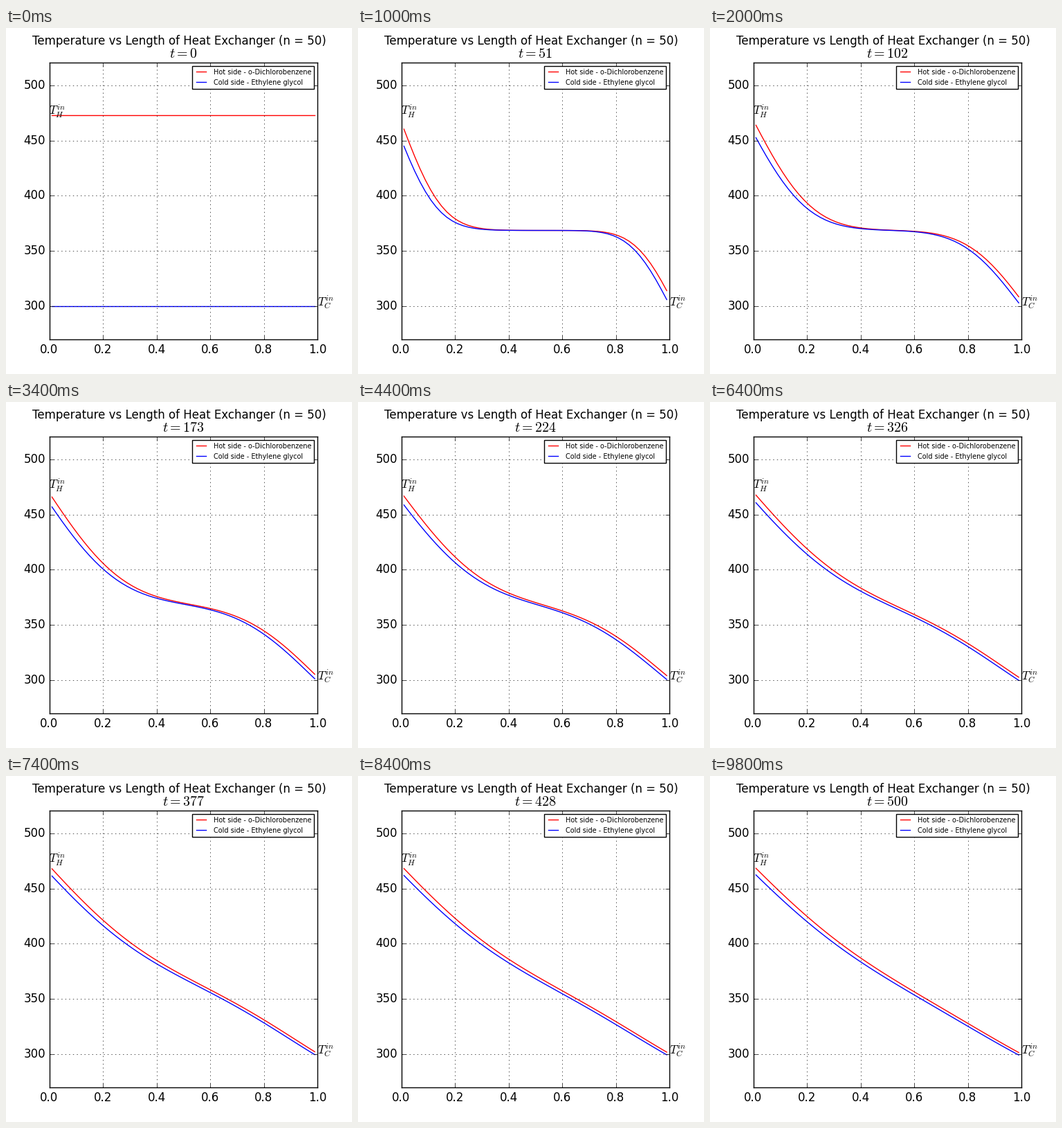
These frames come from a looping animation (500 by 500 pixels, 10000 ms). A matplotlib script:

```python
import numpy as np
import matplotlib.pyplot as plt
from matplotlib.animation import FuncAnimation

CELLS, FRAMES, T_END = 50, 50, 500
SUBSTEPS = 25
HOT_IN, COLD_START = 473.15, 300.0
DT = T_END / (FRAMES - 1) / SUBSTEPS

# Key temperatures (hot, cold) early and late, at five places along the tube
KEY_FRAMES = [10, 49]
KEY_CELLS = [0, 9.5, 24.5, 39.5, 49]
KEY_TEMPS = np.array([
    [[464.1, 394.0, 368.8, 355.2, 308.8], [452.8, 388.5, 368.6, 351.7, 303.2]],
    [[468.8, 424.7, 371.4, 328.2, 301.3], [462.7, 419.7, 368.3, 325.1, 299.2]],
])


def simulate(params):
    """Counter-current exchanger for each parameter row: (frame, side, row, cell)."""
    flow_h, flow_c, k_h, k_c, cp_h, cp_c, cold_in = params.T[..., None]
    rows = len(params)
    hot_in = np.full((rows, 1), HOT_IN)
    hot = np.full((rows, CELLS), HOT_IN)
    cold = np.full((rows, CELLS), COLD_START)
    history = [np.stack([hot, cold])]
    for _ in range(FRAMES - 1):
        for _ in range(SUBSTEPS):
            gap = hot - cold
            hot_up = np.concatenate([hot_in, hot[:, :-1]], axis=1)
            cold_up = np.concatenate([cold[:, 1:], cold_in], axis=1)
            # heat capacity grows linearly with temperature
            d_hot = flow_h * (hot_up - hot) - k_h * gap / (1 + cp_h * (hot - 370) / 100)
            d_cold = flow_c * (cold_up - cold) + k_c * gap / (1 + cp_c * (cold - 370) / 100)
            hot = hot + DT * d_hot
            cold = cold + DT * d_cold
        history.append(np.stack([hot, cold]))
    return np.array(history)


def calibrate(params, rounds=12, eps=1e-3, damping=2.0):
    """Damped Gauss-Newton fit of the exchanger to the key temperatures."""
    n = len(params)
    left, right = np.floor(KEY_CELLS).astype(int), np.ceil(KEY_CELLS).astype(int)
    for _ in range(rounds):
        trial = np.vstack([params, params * (1 + eps * np.eye(n))])
        temps = simulate(trial)[KEY_FRAMES]
        temps = (temps[..., left] + temps[..., right]) / 2
        temps = np.moveaxis(temps, 2, 0).reshape(n + 1, -1)
        jac = (temps[1:] - temps[0]).T / eps
        miss = KEY_TEMPS.ravel() - temps[0]
        step = np.linalg.solve(jac.T @ jac + damping * np.eye(n), jac.T @ miss)
        params = params * (1 + np.clip(step, -0.2, 0.2))
    return params


# flow rates, exchange rates, heat capacity slopes, cold inlet temperature
guess = np.array([0.45, 0.25, 0.43, 0.24, 0.22, 0.22, 296.0])
curves = simulate(calibrate(guess)[None])[:, :, 0]

plt.style.use("classic")
plt.rcParams.update({"font.family": "DejaVu Sans", "figure.facecolor": "white"})

fig, ax = plt.subplots(figsize=(5, 5), dpi=100)
fig.subplots_adjust(left=0.125, right=0.9, bottom=0.1, top=0.9)
fig.suptitle("Temperature vs Length of Heat Exchanger (n = 50)", fontsize=12)

x = (np.arange(CELLS) + 0.5) / CELLS
hot_line, = ax.plot(x, curves[0, 0], "r", label="Hot side - o-Dichlorobenzene")
cold_line, = ax.plot(x, curves[0, 1], "b", label="Cold side - Ethylene glycol")
ax.set_xlim(0, 1)
ax.set_ylim(0.9 * COLD_START, 1.1 * HOT_IN)
ax.grid(True)
ax.text(0, HOT_IN, "$T_H^{in}$", fontsize=12)
ax.text(1, COLD_START, "$T_C^{in}$", fontsize=12)
ax.legend(loc="upper right", fontsize=7)
title = ax.set_title("$t = 0$")


def update(i):
    hot_line.set_ydata(curves[i, 0])
    cold_line.set_ydata(curves[i, 1])
    title.set_text("$t = %d$" % (T_END * i // (FRAMES - 1)))
    return hot_line, cold_line, title


anim = FuncAnimation(fig, update, frames=FRAMES, interval=200,
                     init_func=lambda: update(0), repeat=True, repeat_delay=0)
plt.show()
```
